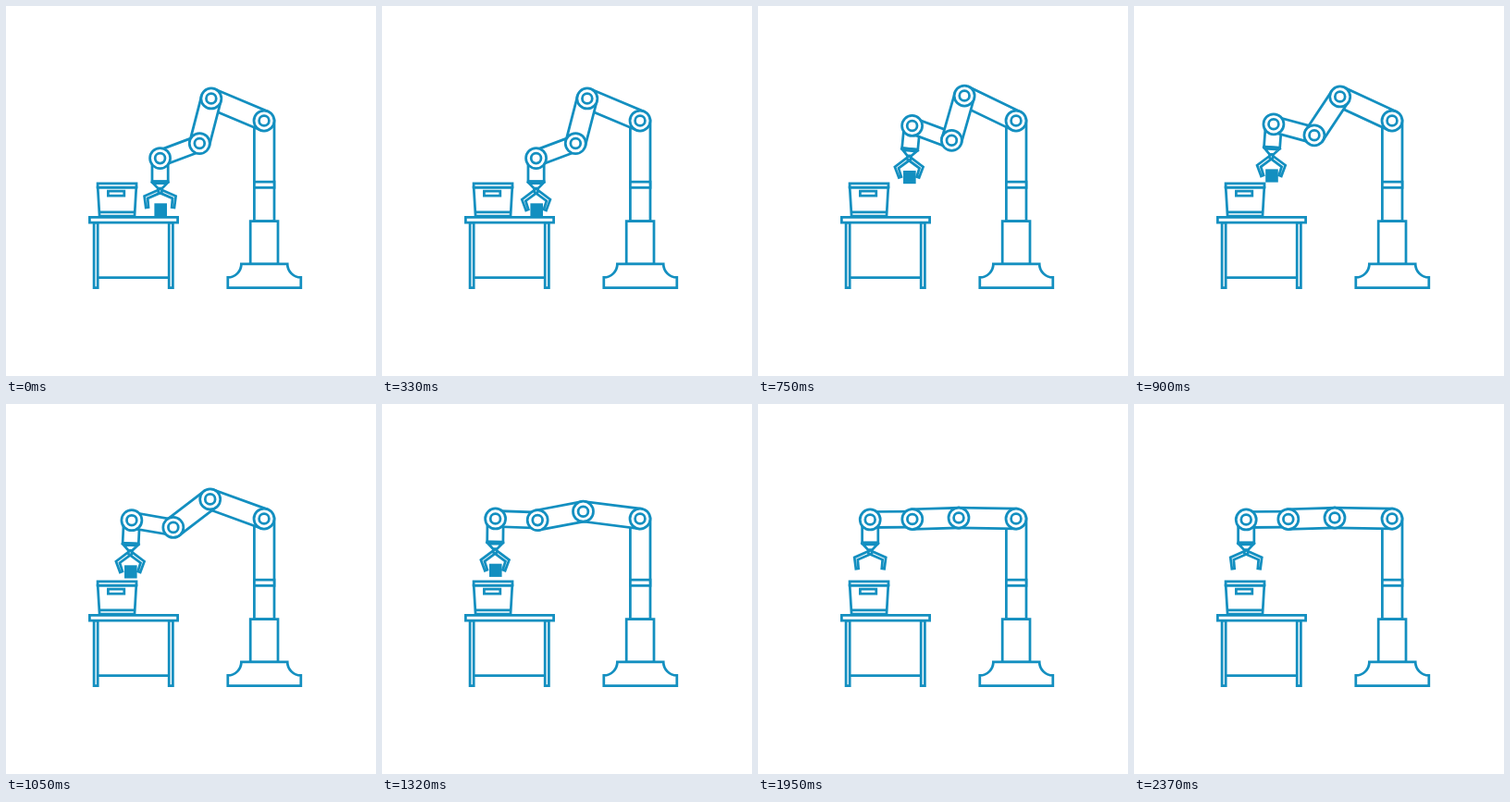
These frames come from a looping animation (400x400 px, 2.91 s). An HTML page with a canvas:

```html
<!DOCTYPE html>
<html lang="en">
<head>
<meta charset="utf-8">
<title>Robot arm</title>
<style>
html, body { margin: 0; width: 100%; height: 100%; overflow: hidden; background: #fff; }
canvas { display: block; width: 400px; height: 400px; }
</style>
</head>
<body>
<canvas id="stage" width="400" height="400"></canvas>
<script>
const ctx = document.getElementById('stage').getContext('2d');
const BLUE = '#138fc0';
const LOOP = 2910, STEP = 30;
const SHOULDER = { x: 279, y: 124 };

// Arm angles in degrees at the three stops
const PICKUP = { upper: 22.8, middle: 75.5, fore: 20.6, hand: 0 };
const LIFTED = { upper: 25.8, middle: 80.7, fore: -22.3, hand: 6 };
const DROP = { upper: 0.9, middle: 1.7, fore: 0.6, hand: 0 };

const radians = degrees => degrees * Math.PI / 180;
const progress = (t, from, to) => Math.min(1, Math.max(0, (t - from) / (to - from)));
const smooth = u => u * u * (3 - 2 * u);
const swing = u => 1 - (1 - u ** 1.4) ** 2.3;

function angle(name, lift, turn) {
  const raised = PICKUP[name] + (LIFTED[name] - PICKUP[name]) * lift;
  return radians(raised + (DROP[name] - raised) * turn);
}

function paint() {
  ctx.fill();
  ctx.stroke();
}

function box(x0, y0, x1, y1) {
  ctx.beginPath();
  ctx.rect(x0, y0, x1 - x0, y1 - y0);
  paint();
}

function shape(...points) {
  ctx.beginPath();
  points.forEach(([x, y]) => ctx.lineTo(x, y));
  ctx.closePath();
  paint();
}

function bar(x0, x1, y) {
  ctx.beginPath();
  ctx.moveTo(x0, y);
  ctx.lineTo(x1, y);
  ctx.stroke();
}

function disc(x, y, r) {
  ctx.beginPath();
  ctx.arc(x, y, r, 0, Math.PI * 2);
  paint();
}

function joint({ x, y }) {
  disc(x, y, 11);
  disc(x, y, 5.4);
}

function link(a, b, half) {
  ctx.save();
  ctx.translate(a.x, a.y);
  ctx.rotate(Math.atan2(b.y - a.y, b.x - a.x));
  box(0, -half, Math.hypot(b.x - a.x, b.y - a.y), half);
  ctx.restore();
}

function reach(from, length, turn) {
  return { x: from.x - length * Math.cos(turn), y: from.y + length * Math.sin(turn) };
}

function column() {
  box(268.4, 124, 290, 232.5);
  box(268.4, 190.2, 290, 196.4);
  box(264.2, 232.5, 294, 279);
  const left = 239.8, right = 318.8, top = 278.8, bottom = 304.6, r = 14.6;
  ctx.beginPath();
  ctx.arc(right, top, r, Math.PI, Math.PI / 2, true);
  ctx.lineTo(right, bottom);
  ctx.lineTo(left, bottom);
  ctx.arc(left, top, r, Math.PI / 2, 0, true);
  ctx.closePath();
  paint();
}

function table() {
  bar(99, 176, 293.5);
  box(95.1, 234, 99.2, 304.6);
  box(176.2, 234, 180.4, 304.6);
  box(90.4, 228.3, 185.6, 234.1);
}

function bin() {
  shape([99.2, 196], [140.8, 196], [139, 227], [101.1, 227]);
  bar(101, 139, 222.8);
  box(99.1, 191.8, 141, 196.2);
  box(110.4, 200.2, 127.8, 205);
}

function claw(hub, closing) {
  for (const side of [-1, 1]) {
    ctx.save();
    ctx.translate(hub.x, hub.y);
    ctx.scale(side, 1);
    ctx.rotate(radians(-13 * closing));
    shape([-1, -1.5], [-17, 5.6], [-15.4, 18], [-12.6, 17.6], [-13.4, 8], [0, 2.2]);
    ctx.restore();
  }
  disc(hub.x, hub.y, 2);
}

function hand(wrist, tilt) {
  ctx.save();
  ctx.translate(wrist.x, wrist.y);
  ctx.rotate(tilt);
  box(-8.6, 0, 8.6, 25);
  shape([-7.6, 27], [7.6, 27], [2.2, 32.6], [-2.2, 32.6]);
  ctx.fillStyle = BLUE;
  ctx.fillRect(-9.8, 23.8, 19.6, 3.4);
  ctx.restore();
}

function draw(t) {
  ctx.fillStyle = '#fff';
  ctx.fillRect(0, 0, 400, 400);
  ctx.strokeStyle = BLUE;
  ctx.lineWidth = 2.75;

  // The upper arm starts its swing later than the rest
  const lift = smooth(progress(t, 330, 660));
  const turn = swing(progress(t, 660, 1600));
  const upperLift = smooth(progress(t, 330, 780));
  const upperTurn = smooth(progress(t, 810, 1570));

  const elbow = reach(SHOULDER, 62, -angle('upper', upperLift, upperTurn));
  const knee = reach(elbow, 50.2, angle('middle', lift, turn));
  const wrist = reach(knee, 45.6, angle('fore', lift, turn));
  const tilt = angle('hand', lift, turn);
  const hub = reach(wrist, 35.3, Math.PI / 2 - tilt);
  const closing = smooth(progress(t, 0, 300)) - smooth(progress(t, 1550, 1750));
  const fall = 30 * smooth(progress(t, 1530, 1770));

  ctx.fillStyle = BLUE;
  ctx.fillRect(hub.x - 6.2, hub.y + 13.4 + fall, 13.6, 14.2);
  ctx.fillStyle = '#fff';

  table();
  bin();
  column();
  claw(hub, closing);
  hand(wrist, tilt);
  link(SHOULDER, elbow, 10.8);
  link(knee, wrist, 8.5);
  link(elbow, knee, 10.8);
  [SHOULDER, elbow, knee, wrist].forEach(joint);
}

const start = performance.now();
function tick() {
  const t = (performance.now() - start) % LOOP;
  draw(Math.floor(t / STEP) * STEP);
  requestAnimationFrame(tick);
}
tick();
</script>
</body>
</html>
```
